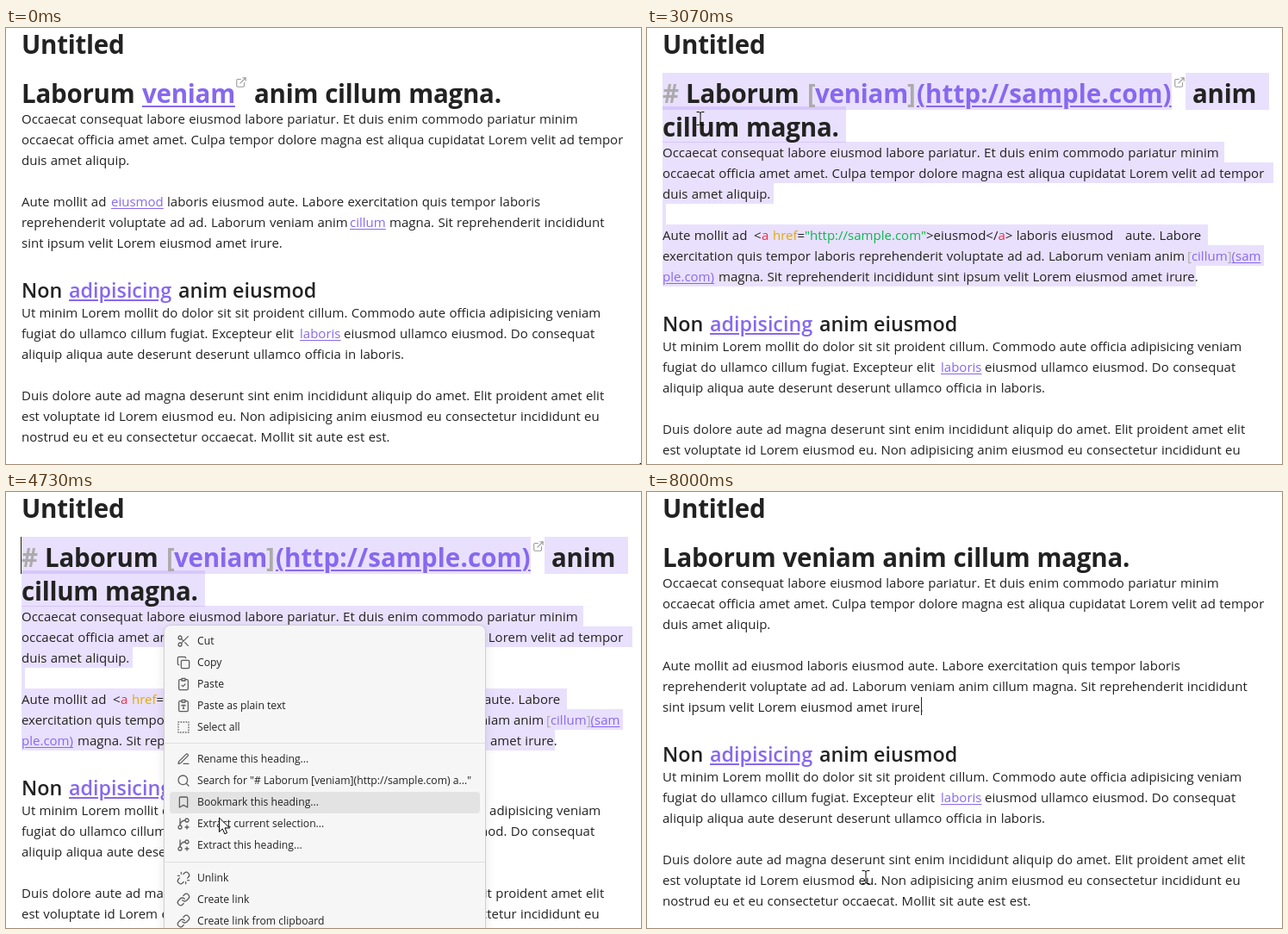
Recreate the animation shown at these times as an HTML page. Size 737 px wide and 506 px high, loop 8190 ms.

```html
<!DOCTYPE html>
<html lang="en">
<head>
<meta charset="utf-8">
<title>Unlinking a selection</title>
<style>
html, body { margin: 0; width: 100%; height: 100%; overflow: hidden; background: #fff; }
#stage { position: relative; width: 737px; height: 506px; overflow: hidden; color: #222; font-family: "Open Sans", "Noto Sans", sans-serif; }
#stage > *, #menu > * { position: absolute; }
svg { overflow: visible; fill: none; stroke-linecap: round; stroke-linejoin: round; }
.p, .h1, .h2, .m { white-space: pre; line-height: 40px; }
.p { font-size: 15px; word-spacing: .45px; }
.h1 { font-size: 29.5px; font-weight: 700; letter-spacing: -.25px; word-spacing: .6px; }
.h2 { font-size: 23.3px; font-weight: 600; }
.m { font-size: 12.2px; }
a, b { color: #8768ee; font-weight: inherit; }
a { text-decoration: underline; }
.p a { text-decoration-thickness: 1px; text-underline-offset: 2px; }
.h1 a { text-decoration-thickness: 2px; text-underline-offset: 3px; }
.url { letter-spacing: .1px; }
i { color: #ababab; font-style: normal; }
#menu { left: 0; top: 0; }
.panel { box-sizing: border-box; background: #f6f6f6; border: 1px solid #d0d0d0; border-radius: 8px;
  box-shadow: 0 2px 4px rgba(0,0,0,.03), 0 3px 14px rgba(0,0,0,.08); }
</style>
</head>
<body>
<div id="stage"></div>
<script>
const LOOP = 8190, STEP = 200 / 3;
const stage = document.getElementById('stage');

// ---- drawing helpers: each returns markup ----
const box = (x, y, w, h, fill, r = 0) =>
  `<div style="left:${x}px;top:${y}px;width:${w}px;height:${h}px;background:${fill};border-radius:${r}px"></div>`;

// One line centred on y; "|x:" starts a new piece at x.
function line(cls, y, text, x = 18) {
  const parts = `|${x}:${text}`.split(/\|(\d+):/).slice(1);
  let out = '';
  for (let i = 0; i < parts.length; i += 2)
    out += `<div class="${cls}" style="left:${parts[i]}px;top:${y - 20}px">${parts[i + 1]}</div>`;
  return out;
}
const para = (y, lines) => lines.map((s, i) => line('p', y + 24 * i, s)).join('');

const icon = (x, y, d, size = 16, color = '#5c5c5c', dash = '') =>
  `<svg style="left:${x}px;top:${y}px" width="${size}" height="${size}" viewBox="0 0 24 24">
  <path d="${d}" stroke="${color}" stroke-width="1.9" stroke-dasharray="${dash}"/></svg>`;
const shape = (x, y, d, fill, stroke, width = 1) =>
  `<svg style="left:${x}px;top:${y}px" width="1" height="1"><path d="${d}" fill="${fill}" stroke="${stroke}" stroke-width="${width}"/></svg>`;

const EXTERNAL = 'M18 13v6a2 2 0 0 1-2 2H5a2 2 0 0 1-2-2V8a2 2 0 0 1 2-2h6M15 3h6v6M10 14L21 3';
const IBEAM = 'M-4-7.5h2.5l1.5 1 1.5-1h2.5M0-6.5v13M-4 7.5h2.5l1.5-1 1.5 1h2.5';
const ARROW = 'M.5.5v16l3.8-3.6 2.6 5.9 2.7-1.2-2.6-5.7h5.2z';

// ---- document ----
const first = ['Occaecat consequat labore eiusmod labore pariatur. Et duis enim commodo pariatur minim',
  'occaecat officia amet amet. Culpa tempor dolore magna est aliqua cupidatat Lorem velit ad tempor',
  'duis amet aliquip.'];
const second = ['Aute mollit ad |122:<a>eiusmod</a>|187:laboris eiusmod aute. Labore exercitation quis tempor laboris',
  'reprehenderit voluptate ad ad. Laborum veniam anim |399:<a>cillum</a>|445:magna. Sit reprehenderit incididunt',
  'sint ipsum velit Lorem eiusmod amet irure.'];
const secondRaw = ['Aute mollit ad |124:&lt;|133:<span style="color:#e93147">a</span>|146:<span style="color:#e0ac00">href</span>=' +
  '<span style="color:#08b94e">"http://sample.com"</span>&gt;eiusmod&lt;/<span style="color:#e93147">a</span>&gt; laboris eiusmod |555:aute. Labore',
  'exercitation quis tempor laboris reprehenderit voluptate ad ad. Laborum veniam |589:anim|627:<i>[</i><b>cillum</b><i>]</i><a>(sam</a>',
  '<a>ple.com)</a>|83:magna. Sit reprehenderit incididunt sint ipsum velit Lorem eiusmod |562:amet irure.'];
const third = ['Ut minim Lorem mollit do dolor sit sit proident cillum. Commodo aute officia adipisicing veniam',
  'fugiat do ullamco cillum fugiat. Excepteur elit |341:<a>laboris</a>|392:eiusmod ullamco eiusmod. Do consequat',
  'aliquip aliqua aute deserunt deserunt ullamco officia in laboris.'];
const fourth = ['Duis dolore aute ad magna deserunt sint enim incididunt aliquip do amet. Elit proident amet elit',
  'est voluptate id Lorem eiusmod eu. Non adipisicing anim eiusmod eu consectetur incididunt eu',
  'nostrud eu et eu consectetur occaecat. Mollit sit aute est est.'];

const page = (heading, dy, middle) => line('h1', 19, 'Untitled') + heading +
  para(105 + dy, first) + para(201 + dy, middle) +
  line('h2', 304 + dy, 'Non |73:<a>adipisicing</a>|200:anim eiusmod') +
  para(330 + dy, third) + para(426 + dy, fourth);

const linked = page(line('h1', 76, 'Laborum |158:<a>veniam</a>|288:anim cillum magna.') +
  icon(266, 56, EXTERNAL, 14, '#999'), 0, second);
const raw = page(line('h1', 76, '<i>#</i>|45:Laborum|186:<i>[</i>|195:<b>veniam</b>|302:<i>]</i>|313:<a class="url">(http://sample.com)</a>|633:anim') +
  line('h1', 115, 'cillum magna.') + icon(611, 56, EXTERNAL, 14, '#999'), 39, secondRaw);
const plain = page(line('h1', 76, 'Laborum veniam anim cillum magna.'), 0,
  second.map(s => s.replace(/\|\d+:/g, ' ').replace(/ +/g, ' ').replace(/<\/?a>/g, '')));

// ---- selection rows: top, height, right edge, optional gap ----
const rows = [[52, 43, 584, 264, 280], [93, 24, 670], [117, 24, 727], [141, 24, 147],
  [165, 24, 22], [189, 24, 627], [213, 24, 704], [237, 24, 318]];
const rawRows = [[52, 43, 722, 609, 625], [91, 42, 231], [132, 24, 670], [156, 24, 727], [180, 24, 147],
  [204, 24, 22], [228, 24, 651], [252, 24, 716], [276, 24, 637]];

function select(list, from = 0, x = 18) {
  const bar = (l, r, y, h) => r > l ? box(l, y, r - l, h, 'rgba(138,92,245,.19)') : '';
  return list.slice(from).map(([y, h, right, gapL, gapR], i) => {
    const left = i ? 18 : x;
    return gapL ? bar(left, gapL, y, h) + bar(Math.max(left, gapR), right, y, h) : bar(left, right, y, h);
  }).join('');
}

// ---- context menu ----
const ring = (x, y, r) => `M${x - r} ${y}a${r} ${r} 0 1 0 ${2 * r} 0a${r} ${r} 0 1 0 ${-2 * r} 0`;
const CLIP = 'M9 2h6v4H9zM16 4h2a2 2 0 0 1 2 2v14a2 2 0 0 1-2 2H6a2 2 0 0 1-2-2V6a2 2 0 0 1 2-2h2';
const BRANCH = 'M6 3v12M15 6a9 9 0 0 0-9 9M18 15v6M21 18h-6' + ring(18, 6, 3) + ring(6, 18, 3);
const LINK = 'M10 13a5 5 0 0 0 7.54.54l3-3a5 5 0 0 0-7.07-7.07l-1.72 1.71M14 11a5 5 0 0 0-7.54-.54l-3 3a5 5 0 0 0 7.07 7.07l1.71-1.71';
const items = [
  [173, 'Cut', ring(6, 6, 3) + ring(6, 18, 3) + 'M20 4L8.12 15.88M14.47 14.48L20 20M8.12 8.12L12 12'],
  [198, 'Copy', 'M10 8h10a2 2 0 0 1 2 2v10a2 2 0 0 1-2 2H10a2 2 0 0 1-2-2V10a2 2 0 0 1 2-2M4 16a2 2 0 0 1-2-2V4a2 2 0 0 1 2-2h10a2 2 0 0 1 2 2'],
  [223, 'Paste', CLIP + 'M9 14l2 2 4-4'],
  [248, 'Paste as plain text', CLIP + 'M9 12v-1h6v1M11 17h2M12 11v6'],
  [273, 'Select all', 'M3 3h18v18H3z', '1 3.5'],
  [310, 'Rename this heading...', 'M12 20h9M16.5 3.5a2.12 2.12 0 0 1 3 3L7 19l-4 1 1-4z'],
  [335, 'Search for "# Laborum [veniam](http://sample.com) a..."', ring(11, 11, 8) + 'M21 21l-4.3-4.3'],
  [360, 'Bookmark this heading...', 'M19 21l-7-4-7 4V5a2 2 0 0 1 2-2h10a2 2 0 0 1 2 2z'],
  [385, 'Extract current selection...', BRANCH],
  [410, 'Extract this heading...', BRANCH],
  [448, 'Unlink', 'M18.84 12.25l1.72-1.71a5 5 0 0 0-7.07-7.07l-1.72 1.71M5.17 11.75l-1.71 1.71a5 5 0 0 0 7.07 7.07l1.71-1.71M8 2v3M2 8h3M16 19v3M19 16h3'],
  [473, 'Create link', LINK],
  [498, 'Create link from clipboard', LINK]];
const menuBody = items.map(([y, label, d, dash]) =>
  icon(198, y - 8, d, 16, '#5c5c5c', dash) + line('m', y, label, 222)).join('');

function menu(hoverY) {
  const hot = items.find(([y]) => hoverY >= y - 12 && hoverY < y + 13);
  return '<div id="menu"><div class="panel" style="left:183px;top:154px;width:374px;height:420px"></div>' +
    box(184, 291, 372, 1, '#e0e0e0') + box(184, 429, 372, 1, '#e0e0e0') +
    (hot ? box(190, hot[0] - 12, 360, 25, '#e3e3e3', 4) : '') + menuBody + '</div>';
}

// ---- motion ----
const path = [[0, 740, 513], [70, 728, 500], [330, 430, 300], [600, 251, 230], [870, 339, 247], [1130, 340, 247],
  [1330, 357, 247], [1400, 357, 247], [1650, 300, 243], [1870, 230, 223], [2070, 135, 180], [2270, 60, 118],
  [2600, 16, 83], [2860, 16, 83], [3200, 90, 118], [3530, 183, 154], [4130, 183, 154], [4400, 212, 245],
  [4730, 247, 377], [5000, 252, 416], [5200, 254, 447], [LOOP, 254, 447]];
function mouse(t) {
  const i = Math.max(1, path.findIndex(k => k[0] >= t));
  const [t0, x0, y0] = path[i - 1], [t1, x1, y1] = path[i];
  const k = (t - t0) / (t1 - t0);
  return [Math.round(x0 + (x1 - x0) * k), Math.round(y0 + (y1 - y0) * k)];
}

const caretOn = [[930, 2330], [3140, 3670], [4200, 4800], [5400, 5930], [5930, 6470], [7000, 7530], [8000, LOOP]];
const caret = (x, y, h) => box(x, y, 1, h, '#222');

function picture(t) {
  const within = (a, b) => t >= a && t < b;
  const [x, y] = mouse(t < STEP ? 0 : t);
  let selection = '', mark = caret(318, 238, 21);

  if (within(1470, 2600)) {
    const row = Math.max(0, rows.findLastIndex(r => r[0] <= y));
    const [top, h, right] = rows[row];
    const fx = Math.min(right, Math.max(18, 18 + Math.round((x - 14) / 7.57) * 7.57));
    selection = select(rows, row, fx);
    mark = caret(Math.round(fx) - 1, top, h - 1);
  } else if (within(2600, 5930)) {
    selection = select(t < 3000 ? rows : rawRows);
    mark = caret(17, 52, 43);
  }
  const text = t < 3000 ? linked : t < 5930 ? raw : plain;
  const open = within(3930, 5870);
  const arrow = (x < 18 && y < 200) || within(4200, 5870);

  return selection + text +
    (caretOn.some(([a, b]) => within(a, b)) ? mark : '') +
    (within(2530, 3000) ? shape(5, 74, 'M-4-2l4 4 4-4', 'none', '#ababab', 1.5) : '') +
    (open ? menu(t < 4200 ? 0 : mouse(t - 40)[1]) : '') +
    (arrow ? shape(x, y, ARROW, '#fff', '#000') : shape(x - .5, y, IBEAM, 'none', '#000'));
}

let last = '';
function tick(now) {
  const t = Math.floor((now % LOOP + 4) / STEP) * STEP + 4;
  const html = picture(Math.min(t, LOOP - 1));
  if (html !== last) stage.innerHTML = last = html;
  requestAnimationFrame(tick);
}
tick(0);
</script>
</body>
</html>
```
